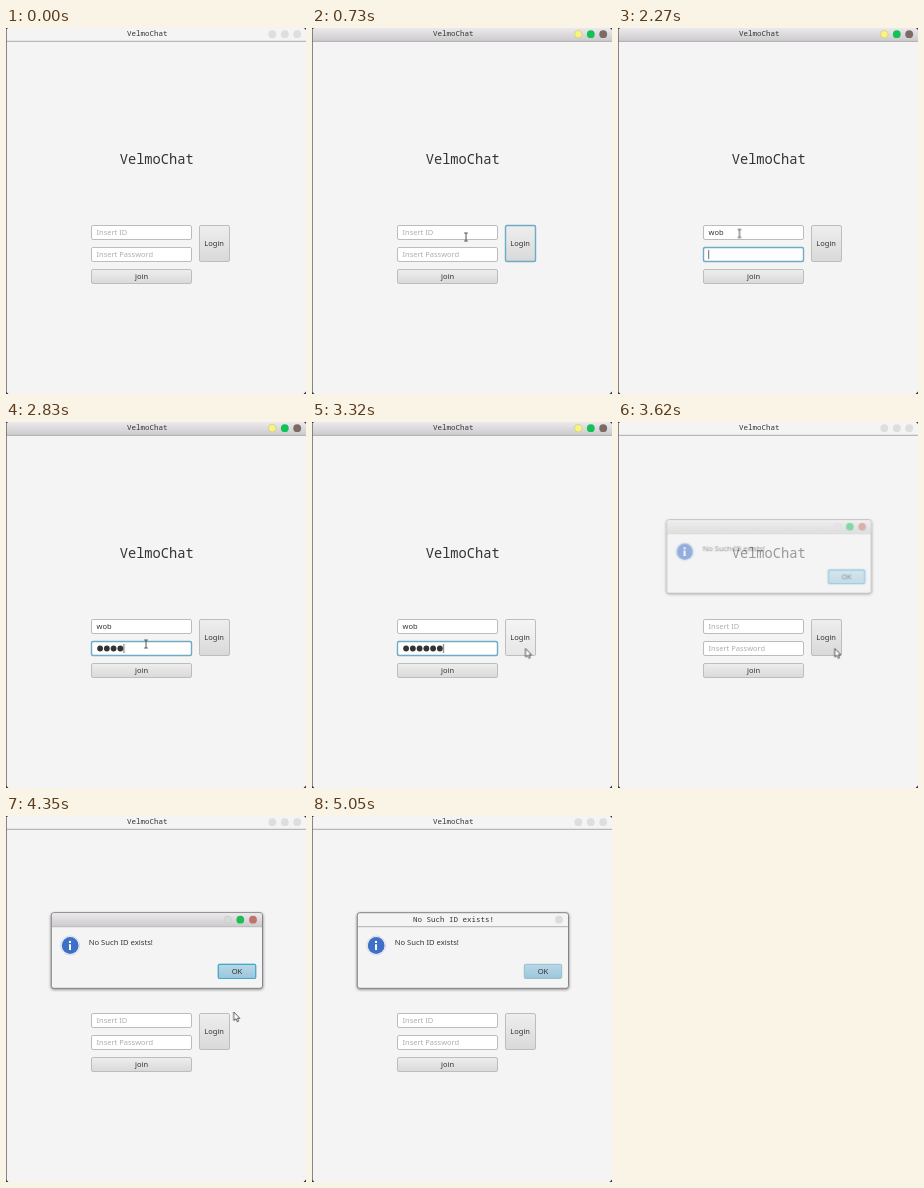
An HTML page that plays this animation: 300 px wide and 366 px high, repeating every 5110 ms.

```html
<!DOCTYPE html>
<html lang="en">
<head>
<meta charset="utf-8">
<title>VelmoChat</title>
<style>
  html, body { margin: 0; width: 100%; height: 100%; overflow: hidden; background: #f4f4f4; }
  svg { display: block; width: 300px; height: 366px; }
  text { font: 7.5px "Noto Sans", sans-serif; fill: #333; white-space: pre; }
  .mono { font-family: "Noto Sans Mono", monospace; }
  .mid { text-anchor: middle; }
  .prompt { fill: #adadad; }
  .field { fill: #fff; stroke: #bcbcbc; }
  .button { fill: url(#face); stroke: #bdbdbd; }
  .focus { fill: none; stroke: #6fabc4; stroke-width: 1.4; }
  .caret { stroke: #444; stroke-width: .8; }
  .gone { opacity: 0; }
  #dialog { transform-origin: 150.5px 134.5px; }
  #dialog text { font-size: 7.65px; }
  #dialog .mono { font-size: 7.5px; }
</style>
</head>
<body>
<svg viewBox="0 0 300 366">
  <defs>
    <linearGradient id="bar" x2="0" y2="1"><stop stop-color="#ebe9eb"/><stop offset="1" stop-color="#cdcbcd"/></linearGradient>
    <linearGradient id="face" x2="0" y2="1"><stop stop-color="#eee"/><stop offset="1" stop-color="#d9d9d9"/></linearGradient>
    <linearGradient id="okFace" x2="0" y2="1"><stop stop-color="#b9d8e7"/><stop offset="1" stop-color="#9cc5da"/></linearGradient>
    <filter id="blur" x="-10%" y="-20%" width="120%" height="140%"><feGaussianBlur stdDeviation="1.6"/></filter>
  </defs>

  <rect width="300" height="366" fill="#f4f4f4"/>
  <g fill="#dedede"><circle cx="266.3" cy="6.2" r="3.9"/><circle cx="278.8" cy="6.2" r="3.9"/><circle cx="291.2" cy="6.2" r="3.9"/></g>
  <path d="M0 13.3H300" stroke="#a9a9a9"/>
  <g id="active" class="gone">
    <rect width="300" height="13" fill="url(#bar)"/>
    <path d="M0 13.3H300" stroke="#b4b4b4"/>
    <circle cx="266.3" cy="6.2" r="3.8" fill="#f8f383" stroke="#c9c577" stroke-width=".6"/>
    <circle cx="278.8" cy="6.2" r="3.9" fill="#12c157"/>
    <circle cx="291.2" cy="6.2" r="3.9" fill="#7c6a65"/>
  </g>
  <text class="mono mid" x="141.2" y="8.3">VelmoChat</text>
  <path d="M.4 2V364" stroke="#6c6c6c" stroke-width=".9"/>
  <path d="M0 0H2L0 2ZM300 0V2L298 0ZM0 366V363.500L2.500 366ZM300 366V363.500L297.500 366Z" fill="#333"/>

  <text class="mono mid" x="150.700" y="135.500" style="font-size:13.7px">VelmoChat</text>

  <rect class="field" x="85.500" y="197.500" width="100" height="14" rx="1.500"/>
  <rect class="field" x="85.500" y="219.500" width="100" height="14" rx="1.500"/>
  <rect class="button" x="85.500" y="241.500" width="100" height="14" rx="1.500"/>
  <rect class="button" x="193.500" y="197.500" width="30" height="36" rx="1.500"/>
  <rect id="hover" class="gone" x="194" y="198" width="29" height="35" fill="#fff" fill-opacity=".35"/>
  <rect id="idFocus" class="focus gone" x="85.500" y="197.500" width="100" height="14" rx="1.500"/>
  <rect id="pwFocus" class="focus gone" x="85.500" y="219.500" width="100" height="14" rx="1.500"/>
  <rect id="loginFocus" class="focus gone" x="193.500" y="197.500" width="30" height="36" rx="1.500"/>
  <text class="mid" x="208.200" y="218">Login</text>
  <text class="mid" x="135.500" y="251">join</text>
  <text id="idPrompt" class="prompt" x="90.500" y="207">Insert ID</text>
  <text id="pwPrompt" class="prompt" x="90.500" y="229">Insert Password</text>
  <g id="typed"></g>
  <g id="dots" fill="#333"></g>
  <path id="idCaret" class="caret gone" d="M90.700 200V209"/>
  <path id="pwCaret" class="caret gone" d="M90.700 222V231"/>

  <g id="dialog" class="gone">
    <rect x="45" y="97.500" width="212" height="76" rx="3" fill="#000" fill-opacity=".5" filter="url(#blur)"/>
    <rect x="45.300" y="96.700" width="211.200" height="75.600" rx="2.500" fill="#f4f4f4" stroke="#858585"/>
    <path d="M46 110.700H256" stroke="#a9a9a9" stroke-width=".9"/>
    <g id="passive" class="gone">
      <circle cx="247" cy="103.700" r="3.900" fill="#dcdcdc"/>
      <text class="mono mid" x="141.500" y="106">No Such ID exists!</text>
    </g>
    <g id="dialogActive">
      <path d="M46 110.200V99Q46 97.200 48 97.200H254Q256 97.200 256 99V110.200Z" fill="url(#bar)"/>
      <circle cx="221.700" cy="103.700" r="3.600" fill="#d9d9d9" stroke="#c4c4c4" stroke-width=".6"/>
      <circle cx="234.300" cy="103.700" r="3.900" fill="#1fbd57"/>
      <circle cx="247" cy="103.700" r="3.900" fill="#bf736a"/>
    </g>
    <circle cx="64.200" cy="129.500" r="9.500" fill="#fff" stroke="#c8d2e2" stroke-width=".8"/>
    <circle cx="64.200" cy="129.500" r="8.400" fill="#3d70c6"/>
    <path d="M63 128.200H65V134H63Z" fill="#fff"/><circle cx="64" cy="125.900" r="1.200" fill="#fff"/>
    <text x="82.700" y="128.700">No Such ID exists!</text>
    <rect x="212.300" y="148.300" width="37.400" height="14.200" rx="1.200" fill="url(#okFace)" stroke="#8fb5c5" stroke-width=".8"/>
    <rect id="okFocus" x="212.300" y="148.300" width="37.400" height="14.200" rx="1.200" fill="none" stroke="#41a9cd" stroke-width="1.200"/>
    <text class="mid" x="231" y="158.200">OK</text>
  </g>

  <g id="pointer">
    <path id="arrow" class="gone" d="M0 0V8.500L2 6.800L3.500 9.800L4.900 9.100L3.500 6.300H6.100Z" fill="#fff" stroke="#333" stroke-width=".8"/>
    <path id="beam" class="gone" d="M-1.800 -4H1.800M0 -4V4M-1.800 4H1.800" fill="none" stroke="#444" stroke-width=".9"/>
  </g>
</svg>
<script>
const LOOP = 5110;
const $ = id => document.getElementById(id);

// rows: [time, styles, easing until the next row]
function play(el, rows) {
  const frames = rows.map(([t, style, easing = 'steps(1, end)']) => ({ ...style, easing, offset: t / LOOP }));
  if (rows[0][0] > 0) frames.unshift({ ...rows[0][1], offset: 0, easing: 'steps(1, end)' });
  frames.push({ ...rows[rows.length - 1][1], offset: 1 });
  el.animate(frames, { duration: LOOP, iterations: Infinity });
}

const fade = (el, ...rows) => play(el, [[0, { opacity: rows[0] }], ...rows.slice(1).map(([t, opacity]) => [t, { opacity }])]);

// spans: [on, off]
const show = (el, ...spans) => fade(el, 0, ...spans.flatMap(([on, off]) => [[on, 1], [off, 0]]));

function add(parent, tag, attrs, text = '') {
  const el = document.createElementNS('http://www.w3.org/2000/svg', tag);
  for (const name in attrs) el.setAttribute(name, attrs[name]);
  el.textContent = text;
  return $(parent).appendChild(el);
}

const CLEAR = 3450;

// Window and focus states
fade($('active'), 0, [490, .5], [540, 1], [3530, .5], [3575, 0]);
show($('loginFocus'), [490, 930], [1890, 2170]);
show($('idFocus'), [930, 1890]);
show($('pwFocus'), [2170, 3370]);
show($('hover'), [3210, 3530]);
fade($('idPrompt'), 1, [930, 0], [CLEAR, 1]);
fade($('pwPrompt'), 1, [2170, 0], [CLEAR, 1]);

// Typing
const keys = [1350, 1570, 1640];
const user = 'wob';
keys.forEach((t, i) => {
  const el = add('typed', 'text', { x: 90.5, y: 207 }, user.slice(0, i + 1));
  show(el, [t, keys[i + 1] || CLEAR]);
});
show($('idCaret'), [930, 1890]);
play($('idCaret'), [[0, { transform: 'translateX(0px)' }],
  ...keys.map((t, i) => [t, { transform: `translateX(${[6.2, 10.7, 15.4][i]}px)` }])]);

const step = 6.75;
const caretRows = [[0, { transform: 'translateX(0px)' }]];
for (let i = 0; i < 6; i++) {
  const t = 2660 + i * 45;
  show(add('dots', 'circle', { cx: 94.1 + i * step, cy: 226.5, r: 2.9 }), [t, CLEAR]);
  caretRows.push([t, { transform: `translateX(${(i + 1) * step + .3}px)` }]);
}
show($('pwCaret'), [2170, 3370]);
play($('pwCaret'), caretRows);

// Dialog
play($('dialog'), [
  [0, { opacity: 0, transform: 'scale(.95)' }],
  [3530, { opacity: 0, transform: 'scale(.95)' }, 'linear'],
  [3620, { opacity: .53, transform: 'scale(.97)' }, 'linear'],
  [3800, { opacity: 1, transform: 'scale(1)' }]
]);
fade($('dialogActive'), 1, [5000, .5], [5050, 0]);
fade($('passive'), 0, [5000, .5], [5050, 1]);
fade($('okFocus'), 1, [5000, .5], [5050, 0]);

// Pointer: time, x, y, number of moves until the next row
const path = [
  [30, 230, 331, 7], [320, 130, 212, 1], [490, 130, 212, 5], [730, 154, 209, 3],
  [880, 121.5, 205.5, 1], [2340, 121.5, 205.5, 3], [2460, 140, 222, 1],
  [2920, 140, 222, 6], [3160, 211, 231, 1], [3210, 211, 231, 2], [3300, 213.5, 226.5, 1],
  [3530, 213.5, 226.5, 2], [3610, 216.7, 226.5, 1], [3665, 216.7, 226.5, 1],
  [3710, 218, 221, 12], [4270, 225.5, 176, 1], [4350, 227.7, 196, 8], [4670, 244, 367, 1]
];
play($('pointer'), path.map(([t, x, y, n]) => [t, { transform: `translate(${x}px, ${y}px)` }, `steps(${n}, end)`]));
show($('arrow'), [30, 538], [3080, 4670]);
show($('beam'), [538, 3080]);
</script>
</body>
</html>
```
